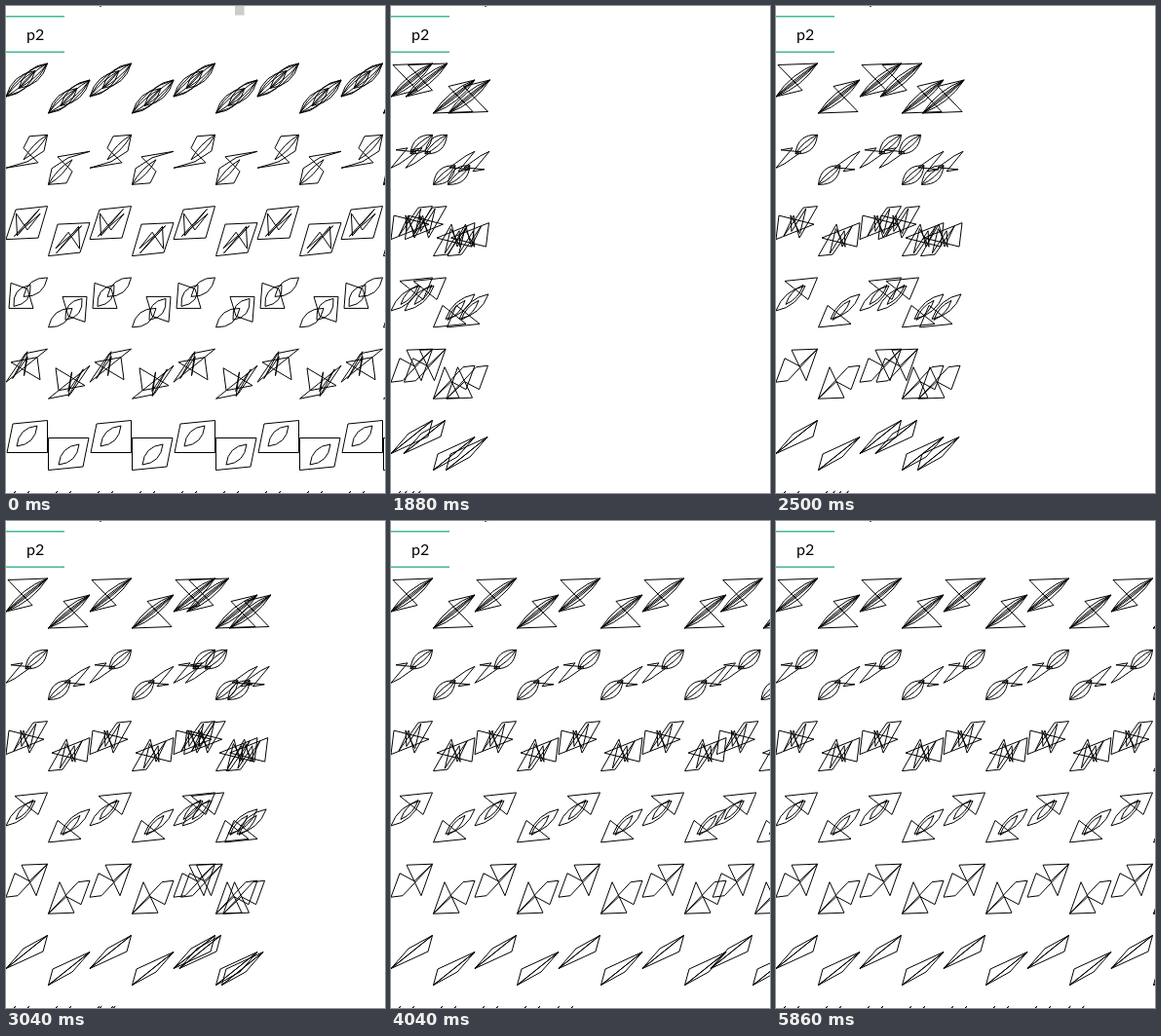
Recreate the animation shown at these times as an HTML page with a canvas. Size 389x500 px, loop 5980 ms.

```html
<!DOCTYPE html>
<html lang="en">
<head>
<meta charset="utf-8">
<title>p2 symmetry</title>
<style>
  html, body { margin: 0; width: 100%; height: 100%; overflow: hidden; background: #fff; }
  canvas { display: block; }
</style>
</head>
<body>
<canvas width="389" height="500"></canvas>
<script>
const ctx = document.querySelector('canvas').getContext('2d');
const LOOP = 5980, ROW = 73.3, TOP = 58.5, CELL = 86;
const CENTER = { x: 43, y: 26 };
const MOVE = 534;                      // duration of one translation
const TURN = { start: 820, end: 1735 };
const TAIL = [0, 34.5], TIP = [42.5, 0.5];

const clamp = v => Math.max(0, Math.min(1, v));

function poly(...points) {
  const path = new Path2D();
  points.forEach(p => path.lineTo(...p));
  path.closePath();
  return path;
}

// A sheaf of arcs between two points, bulging evenly to both sides
function lens(a, b, arcs, bulge) {
  const path = new Path2D();
  const dx = b[0] - a[0], dy = b[1] - a[1], length = Math.hypot(dx, dy);
  for (let i = 0; i < arcs; i++) {
    const offset = bulge * (2 * i / (arcs - 1) - 1);
    path.moveTo(...a);
    path.quadraticCurveTo(
      (a[0] + b[0]) / 2 - dy / length * offset,
      (a[1] + b[1]) / 2 + dx / length * offset, ...b);
  }
  return path;
}

// A closed random line that zigzags across the slanted cell
function scribble(corners, seed) {
  const random = () => (seed = seed * 16807 % 2147483647) / 2147483647;
  const points = Array.from({ length: corners }, (_, i) => {
    const y = i % 2 ? 24 + 8 * random() : 3 + 10 * random();
    return [12 - y / 3 + 26 * random(), y];
  });
  return poly(...points);
}

const firstSet = [
  [lens(TAIL, [30, 8], 4, 13), lens([13, 26], TIP, 4, 13), lens(TAIL, TIP, 2, 12)],
  [poly(TAIL, [33, 29], [18, 14], [24, 2], TIP, [39, 17], [22, 28]), lens([18, 26], TIP, 2, 5)],
  [poly(TAIL, [10, 4], TIP, [33, 33]), scribble(6, 4211)],
  [poly([3, 32], [5, 6], [22, 12], [28, 32]), lens([18, 20], TIP, 2, 13), lens([8, 30], [25, 8], 2, 13)],
  [poly(TAIL, [20, 5], TIP), poly([5, 14], [35, 32], [32, 9]), scribble(4, 733)],
  [poly([7, 4], TIP, [42.5, 33.5], [1, 33.5]), lens([11, 27], [32, 6], 2, 12)]
];
const secondSet = [
  [poly([2, 2], TIP, TAIL, [27, 28]), lens(TAIL, TIP, 4, 9)],
  [lens([20, 20], TIP, 4, 14), poly(TAIL, [17, 14], [5, 16], [26, 18], [9, 30])],
  [poly(TAIL, [3, 10], [39, 19]), poly([28, 2], TIP, [24, 33], [18, 10], [8, 31]), scribble(4, 97)],
  [poly([9, 4], TIP, [33, 23]), lens(TAIL, [30, 9], 2, 11), lens([10, 28], [28, 8], 2, 6)],
  [poly([16, 1.5], TIP, [31, 33]), poly(TAIL, [9, 10], [24, 18], TIP, [12, 33])],
  [poly(TAIL, [18, 14], TIP, [38, 17]), poly(TAIL, TIP)]
];
const tips = [poly([8, 1.7], [10, 0]), poly([22, 1.7], [24, 0])];

// Translations done so far: constant speed, a short rest after each, later rows lagging
function progress(t, row) {
  const period = 585 + 3.4 * row;
  const elapsed = Math.max(0, t - 1785 - 3 * row);
  const step = Math.floor(elapsed / period);
  return step + clamp((elapsed - step * period) / MOVE);
}

function drawMotif(motif, x, angle = 0) {
  ctx.save();
  ctx.translate(x + CENTER.x, CENTER.y);
  ctx.rotate(angle);
  ctx.translate(-CENTER.x, -CENTER.y);
  motif.forEach(path => ctx.stroke(path));
  ctx.restore();
}

function drawRow(row, amount, pitch, drawAt) {
  ctx.save();
  ctx.beginPath();
  ctx.rect(0, 48 + ROW * row, 389, ROW);
  ctx.clip();
  ctx.translate(0, TOP + ROW * row);
  for (let i = 0; i <= Math.floor(amount); i++) drawAt(i * pitch);
  if (amount % 1) drawAt(amount * pitch);
  ctx.restore();
}

function drawLabel() {
  ctx.fillStyle = '#45b795';
  ctx.fillRect(0, 10, 60, 1.5);
  ctx.fillRect(0, 46.5, 60, 1.5);
  ctx.fillStyle = '#000';
  ctx.font = '16px Lato, sans-serif';
  ctx.textAlign = 'center';
  ctx.fillText('p2', 30.2, 35);
  ctx.fillRect(96, 0, 2, 0.6);
}

function render(t) {
  ctx.fillStyle = '#fff';
  ctx.fillRect(0, 0, 389, 500);
  if (t >= 480 && t < 660) return;

  const full = t < 480;
  const turn = full ? 1 : clamp((t - TURN.start) / (TURN.end - TURN.start)) ** 1.37;
  ctx.strokeStyle = '#000';
  ctx.lineWidth = 1;
  ctx.lineJoin = 'round';

  (full ? firstSet : secondSet).forEach((motif, row) =>
    drawRow(row, full ? 4 : progress(t, row), CELL, x => {
      drawMotif(motif, x);
      if (turn) drawMotif(motif, x, Math.PI * turn);
    }));
  drawRow(6, full ? 8 : progress(t, 6), CELL / 2, x => drawMotif(tips, x));

  drawLabel();
  if (t < 260) {
    ctx.fillStyle = '#ccc';
    ctx.fillRect(235, 0, 9.5, 9.5);
  }
}

function frame() {
  render(performance.now() % LOOP);
  requestAnimationFrame(frame);
}
frame();
</script>
</body>
</html>
```
